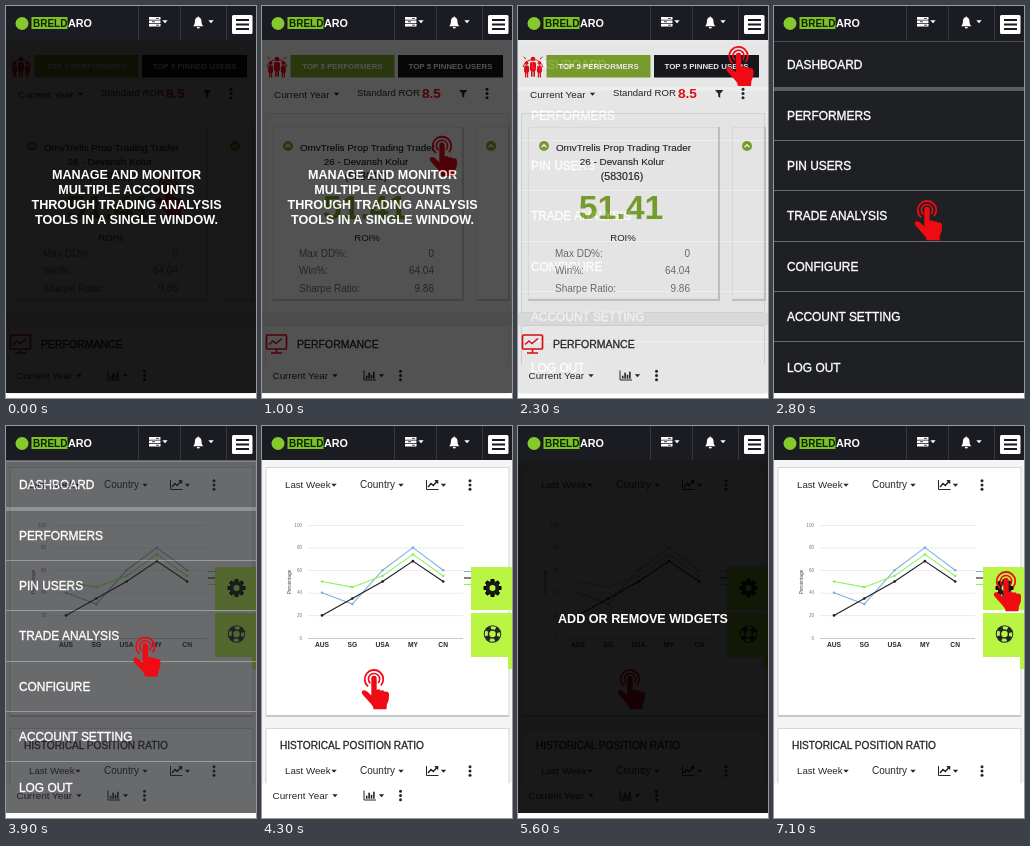
Write an HTML page that moves like this. It is 250 px wide and 392 px high and loops after 8000 ms.

```html
<!DOCTYPE html>
<html lang="en">
<head>
<meta charset="utf-8">
<title>Trading app demo</title>
<style>
html, body { margin: 0; width: 100%; height: 100%; overflow: hidden; background: #fff; }
svg { display: block; width: 250px; height: 392px; }
text { font-family: "Liberation Sans", Arial, sans-serif; white-space: pre; }
</style>
</head>
<body>
<svg id="stage" viewBox="0 0 250 392" xmlns="http://www.w3.org/2000/svg"></svg>
<script>
const INK = '#24262b', LIME = '#b9f542', RED = '#f00a14', GREEN = '#82aa2e';
const TOP = 34, BOTTOM = 387;

// y is the vertical centre of the capitals
const text = (x, y, s, size = 10, fill = INK, opt = '') =>
  `<text x="${x}" y="${y + size * 0.36}" font-size="${size}" fill="${fill}" ${opt}>${s}</text>`;
const rect = (x, y, w, h, fill, opt = '') =>
  `<rect x="${x}" y="${y}" width="${w}" height="${h}" fill="${fill}" ${opt}/>`;
const path = (d, stroke, width = 1, opt = '') =>
  `<path d="${d}" fill="none" stroke="${stroke}" stroke-width="${width}" ${opt}/>`;
const shape = (d, fill = INK) => `<path d="${d}" fill="${fill}"/>`;
const circle = (x, y, r, fill, opt = '') =>
  `<circle cx="${x}" cy="${y}" r="${r}" fill="${fill}" ${opt}/>`;
const group = (id, s) => `<g id="${id}">${s}</g>`;
const at = (x, y, s) => `<g transform="translate(${x} ${y})">${s}</g>`;
const page = fill => rect(0, TOP, 250, BOTTOM - TOP, fill);
const BOLD = 'font-weight="700" ', MID = 'text-anchor="middle" ', END = 'text-anchor="end" ';
const thick = (c, w = 0.3) => `stroke="${c}" stroke-width="${w}"`;

const caret = (x, y, fill = INK) => shape(`M${x - 2.7} ${y - 1.3}h5.4l-2.7 3z`, fill);
const dots = (x, y) => [-4.3, 0, 4.3].map(d => circle(x, y + d, 1.5, INK)).join('');
const bars = (x, y) => path(`M${x - 5.5} ${y - 5}v9.5h12`, INK) +
  [3, 6, 4, 7].map((h, i) => rect(x - 3.6 + i * 2.4, y + 3.2 - h, 1.6, h, INK)).join('');
const trend = (x, y) => path(`M${x - 5.5} ${y - 5}v9.5h12`, INK) +
  path(`M${x - 4} ${y + 2}l3 -3.5 2.3 2 4 -4.5m-2.5 -.3h2.8v2.8`, INK, 1.4);

function navbar() {
  return rect(0, 0, 250, TOP, '#1b1c21') +
    [132, 174, 220].map(x => rect(x, 0, 1, TOP, '#34363c')).join('') +
    circle(16, 17.5, 6.5, '#86c92c') +
    rect(25.5, 11, 36, 12, '#79c223') +
    text(27, 17.2, 'BRELD', 10, '#14200a', BOLD) +
    text(62, 17.2, 'ARO', 10.8, '#fff', BOLD) +
    [11, 14.4, 17.8].map((y, i) => rect(143, y, 11.5, 2.7, '#fff', 'rx=".5"') +
      rect(i % 2 ? 146 : 150, y + 0.9, 3, 0.9, '#33353a')).join('') +
    caret(159, 15.5, '#fff') +
    shape('M187 20.3c2-1.6 1.8-4 2-6 .3-1.9 1.4-2.8 2.7-3.1v-.8h1v.8c1.3.3 2.4 1.2 2.7 3.1.2 2 0 4.4 2 6zM190.8 21h3a1.5 1.5 0 0 1-3 0z', '#fff') +
    caret(205, 15.5, '#fff') +
    rect(226, 9, 20.5, 19, '#fff', 'rx="1.5"') +
    [13, 17.5, 22].map(y => rect(230, y, 13, 2, '#17181b')).join('');
}

const person = (x, y, k) => circle(x, y, 2.2 * k, RED) +
  at(x, y, `<g transform="scale(${k})">${shape('M-2.9 11V5q0-2.300 2.900-2.300T2.900 5v6h-1v6h-1.500v-5h-.8v5h-1.500v-6z', RED)}</g>`);
const badge = (x, y) => circle(x, y, 5, GREEN) +
  path(`M${x - 2.5} ${y + 1.3}l2.5-2.6 2.5 2.6`, '#fff', 1.4);
const card = (x, w) => rect(x, 121, w, 174, '#d2d2d2') + rect(x, 121, w - 2, 172, '#f0f0f0') +
  rect(x + 1, 122, w - 3.5, 170.5, '#fdfdfd');

function performers() {
  const stats = [['Max DD%:', '0'], ['Win%:', '64.04'], ['Sharpe Ratio:', '9.86']];
  return page('#fff') +
    path('M5 61a10.500 10.500 0 0 1 20 0M8 53l-2.500-2M22 53l2.500-2', RED) +
    person(15, 53, 1.05) + person(8.6, 57, 0.85) + person(21.4, 57, 0.85) +
    rect(28.5, 49, 104, 22.5, GREEN) + rect(136, 49, 105, 22.5, '#17181b') +
    text(80.5, 60.5, 'TOP 5 PERFORMERS', 7.9, '#fff', BOLD + MID) +
    text(188.5, 60.5, 'TOP 5 PINNED USERS', 7.9, '#fff', BOLD + MID) +
    text(12, 88, 'Current Year', 9.9) + caret(74.5, 88) +
    text(95, 86.5, 'Standard ROR', 9.6) + text(160, 87, '8.5', 13.6, RED, BOLD) +
    shape('M197 84h8.4l-3.2 3.8v4.2l-2-1.4v-2.8z') + dots(225, 87.5) +
    rect(3.5, 107.5, 243, 199, '#fbfbfb', 'stroke="#e6e6e6"') +
    card(10, 192) + card(214, 34) +
    badge(26, 140) + badge(229, 140) +
    text(105.5, 141, 'OmvTrelis Prop Trading Trader', 9.9, INK, MID + thick(INK, 0.15)) +
    text(104, 155.5, '26 - Devansh Kolur', 9.9, INK, MID + thick(INK, 0.15)) +
    text(104, 170, '(583016)', 10.6, INK, MID + thick(INK, 0.2)) +
    text(103, 201, '51.41', 33.8, GREEN, BOLD + MID) +
    text(105, 231.5, 'ROI%', 9.6, INK, MID) +
    stats.map(([k, v], i) => text(37, 247 + i * 17.7, k, 10, '#707278') +
      text(172, 247 + i * 17.7, v, 10, '#707278', END)).join('') +
    rect(0, 307, 250, 12, '#efefef') + rect(3.5, 319.5, 243, 67.5, '#fff', 'stroke="#e2e2e2"') +
    rect(4.5, 329, 20, 14, 'none', `stroke="${RED}" stroke-width="1.7" rx="1"`) +
    path('M7 338.5l4-3.5 3 2.500 6-5M14.500 343v3.500M9 347h11', RED, 1.6) +
    text(35, 338.5, 'PERFORMANCE', 10.5, INK, thick(INK));
}

const periodRow = () => rect(0, 358, 250, BOTTOM - 358, '#fff') +
  text(10.5, 369.5, 'Current Year', 9.9) + caret(73, 369.5) +
  bars(107.5, 369.5) + caret(119.5, 369.5) + dots(138.5, 369.5);

const controls = y => text(23, y, 'Last Week', 9.7) + caret(72, y) +
  text(98, y - 0.5, 'Country', 10) + caret(139, y) +
  trend(170, y) + caret(181.5, y) + dots(208, y);

function charts() {
  const py = v => 212 - v * 1.13, px = i => 60 + i * 30.3;
  const series = [
    ['#7fb2e0', [40, 30, 60, 80, 60]],
    ['#8ff05a', [50, 45, 55, 74, 55]],
    ['#1d1d1f', [20, 35, 50, 68, 50]]
  ];
  const gear = Array.from({ length: 8 }, (_, i) =>
    `<rect x="-2" y="-9" width="4" height="5" rx=".8" transform="rotate(${i * 45})"/>`).join('');
  return page('#fff') + rect(0, TOP, 250, 357 - TOP, '#f4f4f4') +
    rect(4, 41.5, 243, 248, '#fff', 'stroke="#d6d6d6"') + rect(4, 289, 243, 2, '#c8c8c8') +
    rect(4, 302.5, 243, 55, '#fff') + path('M4 357.5V302.5H247V357.5', '#d6d6d6') +
    controls(59) +
    [0, 20, 40, 60, 80, 100].map(v => rect(46, py(v), 155, 0.7, v ? '#e2e2e2' : '#b5b5b5') +
      text(40, py(v), v, 4.6, '#777', END)).join('') +
    `<g transform="rotate(-90 27 156)">${text(27, 156, 'Percentage', 4.8, '#444', MID)}</g>` +
    ['AUS', 'SG', 'USA', 'MY', 'CN'].map((s, i) =>
      text(px(i), 219, s, 6.7, INK, BOLD + MID)).join('') +
    series.map(([c, vs], k) =>
      path('M' + vs.map((v, i) => px(i) + ' ' + py(v)).join('L'), c, 1.1) +
      vs.map((v, i) => circle(px(i), py(v), 1.3, c)).join('') +
      path(`M202 ${[145.5, 158.5, 152][k]}h7`, c, 1.1)).join('') +
    rect(209, 141, 41, 43, LIME) + rect(209, 187, 41, 44, LIME) + rect(246, 231, 4, 12, LIME) +
    at(230.5, 162, gear + circle(0, 0, 5, 'none', 'stroke="#17181b" stroke-width="4"')) +
    at(230.5, 208, circle(0, 0, 6, 'none', `stroke="${INK}" stroke-width="5.5"`) +
      circle(0, 0, 6.2, 'none', `stroke="${LIME}" stroke-width="3" stroke-dasharray="4.87" stroke-dashoffset="2.43"`)) +
    text(18, 319, 'HISTORICAL POSITION RATIO', 10.1, INK, thick(INK)) +
    controls(345);
}

function menu() {
  const items = ['DASHBOARD', 'PERFORMERS', 'PIN USERS', 'TRADE ANALYSIS', 'CONFIGURE', 'ACCOUNT SETTING', 'LOG OUT'];
  return page('#1f2024') + rect(0, 35, 250, 1, '#4a4b4f') +
    items.map((s, i) => {
      const y = 59 + i * 50.4;
      const line = i === 0 ? rect(0, 81, 250, 4, '#5b5c5e')
        : i < 6 ? rect(0, Math.round(y + 24.3), 250, 1, '#6a6b6d') : '';
      return text(13, y, s, 11.9, '#fff', thick('#fff', 0.35)) + line;
    }).join('');
}

const hand = () =>
  path('M-6 7.4A9.3 9.3 0 1 1 7 6.4', RED, 1.8) +
  path('M-3.6 4.3A5.6 5.6 0 1 1 4 4', RED, 1.6) +
  shape('M-2.7-.5a2.7 2.7 0 0 1 5.4 0V11q2.3-1.6 4 .7 2.4-1.2 3.9 1 3.8-1 4.5 2.2 .4 6-2.2 10.6l-.4 4.7H-.5q-.2-3-2.2-5L-11.4 15.500q-2-3 .8-4.200 2-.6 4 1.500l3.900 3.700z', RED);

const cover = (x, y, lines) => `<g opacity=".9">${page('#000')}</g>` +
  lines.map((s, i) => text(x, y + i * 15.1, s, 12.6, '#fff', BOLD + MID)).join('');

document.getElementById('stage').innerHTML =
  group('first', performers()) + group('second', charts()) + group('row', periodRow()) +
  group('menu', menu()) + navbar() + group('hand', hand()) +
  group('intro', cover(120.5, 168, ['MANAGE AND MONITOR', 'MULTIPLE ACCOUNTS', 'THROUGH TRADING ANALYSIS', 'TOOLS IN A SINGLE WINDOW.'])) +
  group('widgets', cover(125, 192.5, ['ADD OR REMOVE WIDGETS']));

const ids = ['first', 'second', 'row', 'menu', 'hand', 'intro', 'widgets'];
const parts = Object.fromEntries(ids.map(id => [id, document.getElementById(id)]));
const fade = (id, a) => {
  parts[id].setAttribute('opacity', a);
  parts[id].style.display = a > 0 ? '' : 'none';
};

// Each transition: start time and number of 100 ms steps
const moves = [[1000, 4], [2300, 6], [3800, 6], [5300, 4], [6600, 6]];
const stops = [[162, 180], [234, 19], [153, 204], [112, 253], [112, 253], [232, 155]];

function draw(t) {
  const p = moves.map(([start, n]) =>
    Math.min(n, Math.max(0, Math.floor((t - start) / 100) + 1)) / n);
  const [reveal, open, close, dim, clear] = p;
  fade('intro', 1 - reveal);
  fade('menu', open ** 1.25 - close);
  fade('first', close > 0 ? 0 : 1);
  fade('second', close > 0 ? 1 : 0);
  fade('widgets', dim - clear);
  fade('row', 1 - clear);
  const pos = k => stops[0][k] + p.reduce((sum, q, i) => sum + q * (stops[i + 1][k] - stops[i][k]), 0);
  parts.hand.setAttribute('transform', `translate(${pos(0)} ${pos(1)})`);
}

const begin = performance.now();
function tick() {
  draw((performance.now() - begin) % 8000);
  requestAnimationFrame(tick);
}
draw(0);
requestAnimationFrame(tick);
</script>
</body>
</html>
```
